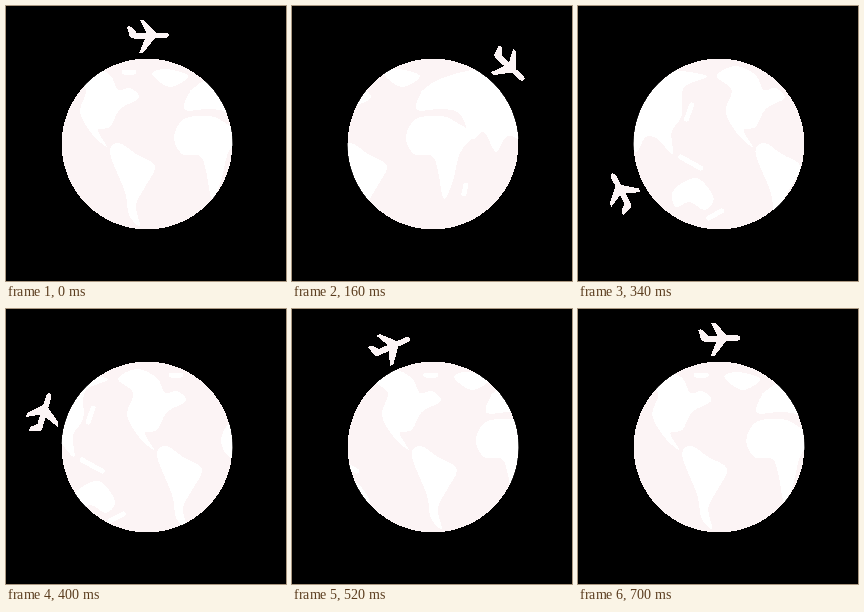
Write an HTML page that moves like this. It is 280 by 275 pixels and loops after 0.73 s.

```html
<!DOCTYPE html>
<html lang="en">
<head>
<meta charset="utf-8">
<title>Plane around the globe</title>
<style>
  html, body { margin: 0; width: 100%; height: 100%; overflow: hidden; background: #000; }
  svg { display: block; width: 100%; height: 100%; shape-rendering: crispEdges; }
</style>
</head>
<body>
<svg viewBox="0 0 280 275">
  <defs>
    <clipPath id="disc"><circle cx="141" cy="138" r="85.4"/></clipPath>
  </defs>
  <circle cx="141" cy="138" r="85.4" fill="#fcf4f5"/>
  <g clip-path="url(#disc)">
    <g id="map" fill="#fff">
      <g id="land">
        <path id="islands" fill="none" stroke="#fff" stroke-width="5" stroke-linecap="round"
          d="M118 66h10M186 86v6M228 179l-2 9M314 99l-5 14M303 151l20 11M331 212l13-7"/>
      </g>
      <use href="#land" x="274"/>
    </g>
  </g>
  <path id="plane" fill="#fcf4f5"
    d="M-20-8.500q3-1.500 5 .5l4.500 5H-1L-7.500-16h4L9-3h9q4 0 4 2.500T18 2.500H8L-3.500 17h-4L-2 3h-11q-4 0-4.500-3Z"/>
</svg>
<script>
const LOOP = 730, STEP = 30, STEPS = 24, WORLD = 274, ORBIT = 108.5;
const $ = id => document.getElementById(id);

// Key points of each coast; a spline runs through them
const coasts = [
  '65,70 84,60 104,69 112,84 124,82 133,92 114,103 104,121 92,124 101,141 86,128 74,106 80,84',
  '146,68 160,63 182,70 164,81',
  '104,147 113,137 130,148 149,160 139,181 130,199 134,220 123,209 119,186',
  '168,131 178,113 204,110 221,118 235,129 222,147 215,175 206,193 200,165 194,150 176,148',
  '178,103 194,77 250,62 327,69 306,82 304,110 294,126 295,148 280,133 268,131 258,146 246,126 234,133 222,108 204,103',
  '295,186 308,175 322,173 336,192 327,204 312,196 298,201'
];

function spline(text) {
  const pts = text.split(' ').map(p => p.split(',').map(Number));
  const n = pts.length;
  const at = i => pts[(i + n) % n];
  const handle = (i, k) => at(i).map((v, a) => v + k * (at(i + 1)[a] - at(i - 1)[a]) / 6);
  return 'M' + pts[0] +
    pts.map((_, i) => `C${handle(i, 1)} ${handle(i + 1, -1)} ${at(i + 1)}`).join('') + 'Z';
}

$('islands').insertAdjacentHTML('afterend', `<path d="${coasts.map(spline).join('')}"/>`);

// Cubic ease with flat ends; x1 and x2 are its time handles
function ease(x, x1, x2) {
  let lo = 0, hi = 1;
  for (let i = 0; i < 24; i++) {
    const s = (lo + hi) / 2, r = 1 - s;
    if (3 * r * r * s * x1 + 3 * r * s * s * x2 + s * s * s < x) lo = s;
    else hi = s;
  }
  return lo * lo * (3 - 2 * lo);
}

function draw(ms) {
  const t = ms % LOOP;
  // the third step is held 10 ms longer
  const step = t < 100 ? Math.min(2, Math.floor(t / STEP)) : Math.floor((t - 10) / STEP);
  const p = step / STEPS;
  const turn = 360 * ease(p, 0.43, 0.24);
  const shift = WORLD * ease(p, 0.34, 0.21);
  $('plane').setAttribute('transform', `translate(141 138) rotate(${turn}) translate(0 ${-ORBIT})`);
  $('map').setAttribute('transform', `translate(${-shift} 0)`);
}

const start = performance.now();
function tick() {
  draw(performance.now() - start);
  requestAnimationFrame(tick);
}
draw(0);
requestAnimationFrame(tick);
</script>
</body>
</html>
```
